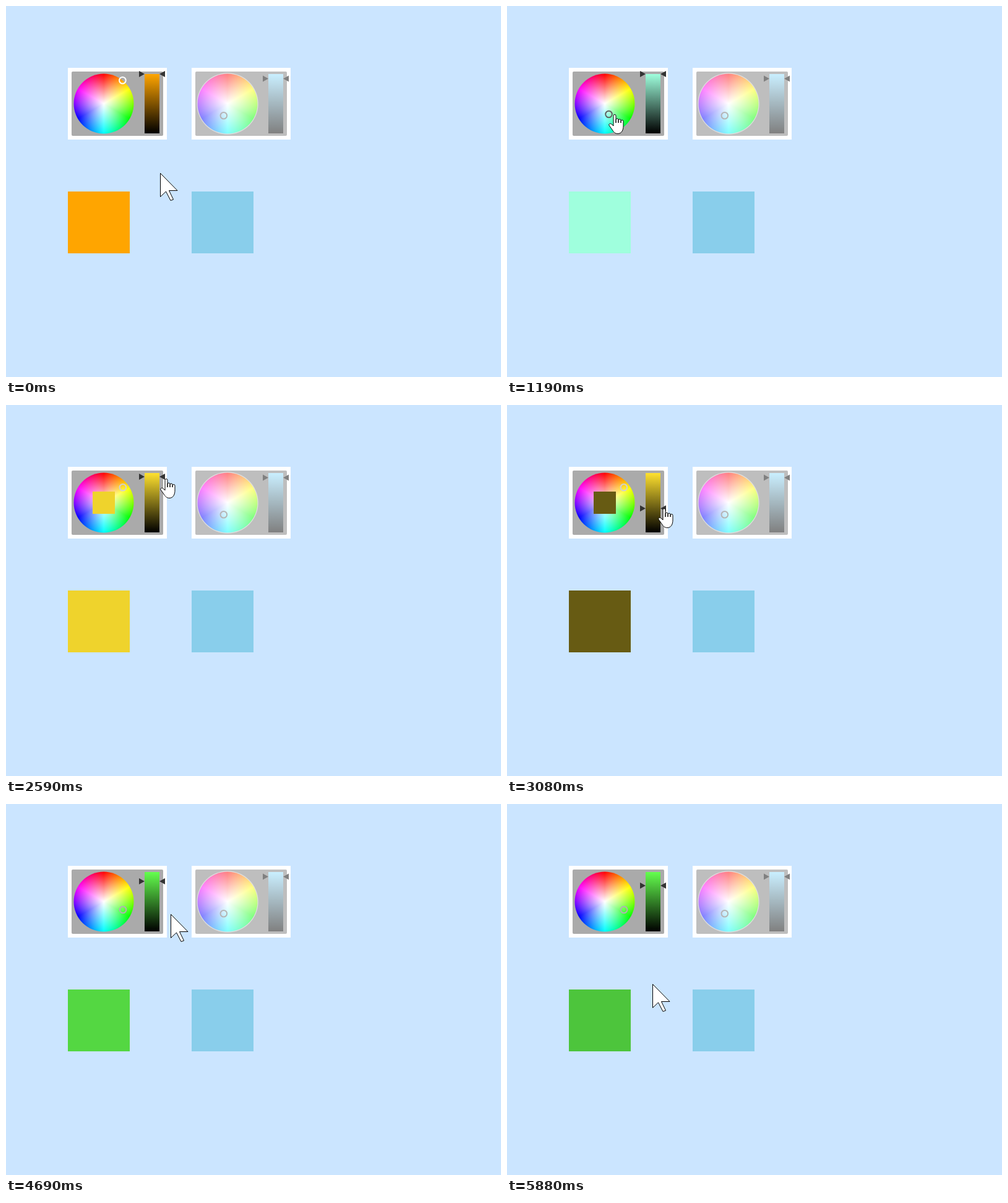
Write an HTML page with a canvas that moves like this. It is 800 px wide and 600 px high and loops after 5.95 s.

```html
<!DOCTYPE html>
<html>
<head>
<meta charset="utf-8">
<title>Color wheels</title>
<style>
html, body { margin: 0; width: 100%; height: 100%; overflow: hidden; background: #cbe5ff; }
canvas { display: block; }
</style>
</head>
<body>
<canvas id="stage" width="800" height="600"></canvas>
<script>
const ctx = document.getElementById('stage').getContext('2d');
const STEP = 70, STEPS = 85, REACH = 48.5, CENTER = 158, BAR_TOP = 110, BAR_LEN = 96;
const arrow = new Path2D('M.5 .5V38.5L9.5 30L17 44.5L21.5 43L14.5 28.5H28Z');
const finger = 'a2 2 0 0 1 4 0V14';
const hand = new Path2D(`M7 19V2.5${finger}V9${finger}V10${finger}V11.5a2 2 0 0 1 4 0V19C23 26 20 31.5 14 31.5C9 31.5 7 28 5 25L0 18C-1 15.5 2 14.5 4 16L7 19Z`);

// Pointer stops: [step, x, y]
const stops = [
  [0, 249, 270], [9, 128, 139], [16.5, 165, 175.5], [26.5, 189, 133],
  [33, 266, 158], [36, 250, 116], [43.5, 244.5, 168], [50, 250, 125],
  [56.5, 189, 170], [62, 189, 171], [67, 266, 178], [70, 252, 177],
  [76, 245, 132], [84, 235, 291]
];
const wheelDrags = [[10, 27], [55, 63]];
const barDrags = [[37, 51], [72, 77]];

function pointer(step) {
  const i = Math.max(1, stops.findIndex(s => s[0] >= step));
  const [s0, x0, y0] = stops[i - 1], [s1, x1, y1] = stops[i];
  const u = (step - s0) / (s1 - s0);
  const ease = u * u * (3 - 2 * u);
  return { x: x0 + (x1 - x0) * ease, y: y0 + (y1 - y0) * ease };
}

// The control trails the pointer by one step and stays where it was released.
function dragged(step, drags, rest) {
  const drag = drags.filter(d => step >= d[0]).pop();
  return drag ? pointer(Math.min(step, drag[1]) - 1) : rest;
}

const during = (step, drags) => drags.some(d => step >= d[0] && step <= d[1]);

function hsv(angle, sat, val) {
  const part = n => {
    const k = (n + angle / (Math.PI / 3) + 12) % 6;
    return Math.round(255 * val * (1 - sat * Math.max(0, Math.min(k, 4 - k, 1))));
  };
  return `rgb(${part(5)},${part(3)},${part(1)})`;
}

function rect(x, y, w, h, fill) {
  ctx.fillStyle = fill;
  ctx.fillRect(x, y, w, h);
}

function disc(r, fill) {
  ctx.fillStyle = fill;
  ctx.beginPath();
  ctx.arc(CENTER, CENTER, r, 0, 7);
  ctx.fill();
}

function triangle(x, y, dx) {
  ctx.beginPath();
  ctx.moveTo(x, y - 5);
  ctx.lineTo(x + dx, y);
  ctx.lineTo(x, y + 5);
  ctx.fill();
}

function wheel() {
  const hues = ctx.createConicGradient(-Math.PI / 2, CENTER, CENTER);
  for (let i = 0; i <= 6; i++) hues.addColorStop(i / 6, `hsl(${i * 60},100%,50%)`);
  const wash = ctx.createRadialGradient(CENTER, CENTER, 0, CENTER, CENTER, REACH);
  wash.addColorStop(0, '#fff');
  wash.addColorStop(1, '#fff0');
  disc(REACH, hues);
  disc(REACH, wash);
}

function picker(left, mark, level, { disabled = false, preview = false } = {}) {
  const dx = mark.x - CENTER, dy = mark.y - CENTER;
  const angle = Math.atan2(dx, -dy);
  const sat = Math.min(1, Math.hypot(dx, dy) / REACH);
  const val = 1 - (level - BAR_TOP) / BAR_LEN;
  const color = hsv(angle, sat, val);

  ctx.save();
  ctx.translate(left, 0);
  rect(100, 100, 160, 116, '#fff');
  ctx.fillStyle = disabled ? '#bebebe' : '#aaa';
  ctx.beginPath();
  ctx.roundRect(106, 106, 148, 104, 2);
  ctx.fill();
  rect(100, 300, 100, 100, color);
  wheel();

  const shade = ctx.createLinearGradient(0, BAR_TOP, 0, BAR_TOP + BAR_LEN);
  shade.addColorStop(0, hsv(angle, sat, 1));
  shade.addColorStop(1, '#000');
  rect(224, BAR_TOP, 24, BAR_LEN, shade);

  if (disabled) {
    const veil = 'rgba(255,255,255,.5)';
    disc(49.7, veil);
    rect(224, BAR_TOP, 24, BAR_LEN, veil);
  }
  ctx.fillStyle = disabled ? '#808080' : '#333';
  triangle(215, level, 9);
  triangle(257, level, -9);

  const gray = Math.round(255 * (disabled ? (sat + 1) / 2 : sat));
  ctx.strokeStyle = `rgb(${gray},${gray},${gray})`;
  ctx.lineWidth = 2;
  ctx.beginPath();
  ctx.arc(mark.x, mark.y, 5.3, 0, 7);
  ctx.stroke();
  if (preview) rect(140, 140, 36, 36, color);
  ctx.restore();
}

function cursor({ x, y }, busy) {
  const onWheel = Math.hypot(x - CENTER, y - CENTER) < 49;
  const onBar = x >= 215 && x <= 257 && y >= 105 && y <= 210;
  const shape = busy || onWheel || onBar ? hand : arrow;
  ctx.save();
  ctx.translate(Math.round(x), Math.round(y));
  ctx.fillStyle = '#fff';
  ctx.strokeStyle = '#000';
  ctx.lineWidth = 1;
  ctx.fill(shape);
  ctx.stroke(shape);
  ctx.restore();
}

function draw() {
  const step = Math.floor(performance.now() / STEP) % STEPS;
  const onBar = during(step, barDrags);
  rect(0, 0, 800, 600, '#cbe5ff');
  picker(0, dragged(step, wheelDrags, { x: 188.4, y: 120.2 }),
    dragged(step, barDrags, { y: BAR_TOP }).y, { preview: onBar });
  picker(200, { x: 151.8, y: 177.3 }, 117.5, { disabled: true });
  cursor(pointer(step), onBar || during(step, wheelDrags));
  requestAnimationFrame(draw);
}
draw();
</script>
</body>
</html>
```
